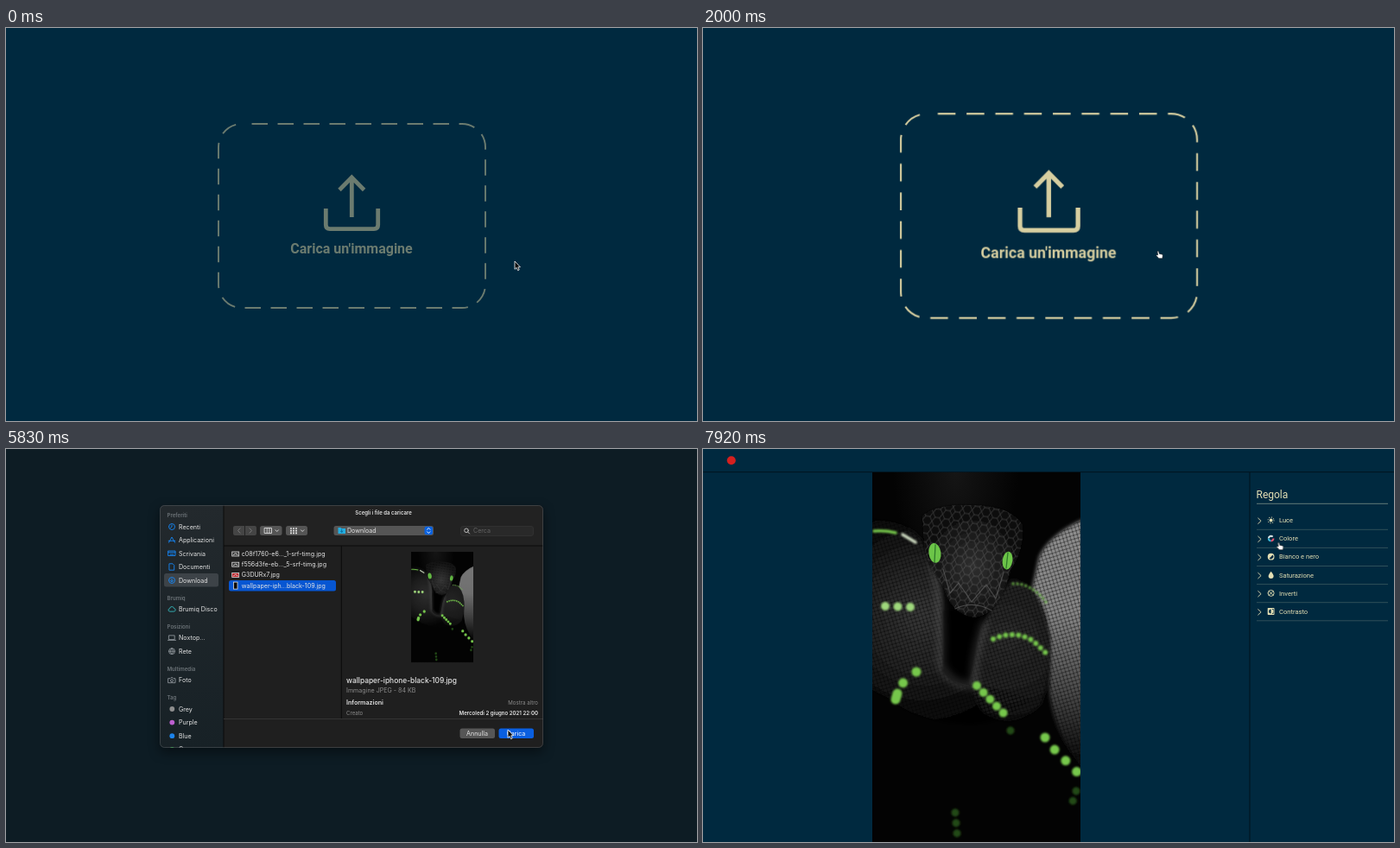
An HTML page for the animation above (8000 ms loop, 800 by 455 pixels).

```html
<!DOCTYPE html>
<html lang="it">
<head>
<meta charset="utf-8">
<title>Carica un'immagine</title>
<style>
  html, body { margin: 0; width: 100%; height: 100%; overflow: hidden; background: #00293f; }
  svg { display: block; }
  #stage { width: 100vw; height: 100vh; }
  text { font-family: Inter, sans-serif; font-size: 7.1px; fill: #e4e4e4; white-space: pre; }
  .brand text { font-family: Roboto, sans-serif; fill: #e4dfb4; }
  .line { fill: none; stroke-linecap: round; stroke-linejoin: round; }
  .head { font-size: 6.1px; font-weight: 600; fill: #6c7378; }
  .small { font-size: 6.1px; }
  .dim { fill: #8b8b8b; }
  .bold { font-weight: 600; }
  .mid { text-anchor: middle; }
  .end { text-anchor: end; }
  #upload { transform-origin: 400px 217.5px; }
  #dialog { filter: drop-shadow(0 5px 7px #0007); }
</style>
</head>
<body>
<svg id="stage" viewBox="0 0 800 455" preserveAspectRatio="none">
  <defs>
    <linearGradient id="pale" gradientUnits="userSpaceOnUse" x1="225" y1="70" x2="205" y2="330">
      <stop offset="0" stop-color="#8c8c8c"/><stop offset=".35" stop-color="#858585"/>
      <stop offset=".7" stop-color="#4a4a4a"/><stop offset="1" stop-color="#0c0c0c"/>
    </linearGradient>
    <radialGradient id="haze" cx=".4" cy="0" r=".3">
      <stop offset="0" stop-color="#151515"/><stop offset="1" stop-color="#030303"/>
    </radialGradient>
    <radialGradient id="leftTone" gradientUnits="userSpaceOnUse" cx="58" cy="165" r="125">
      <stop offset="0" stop-color="#363636"/><stop offset=".5" stop-color="#232323"/><stop offset="1" stop-color="#050505"/>
    </radialGradient>
    <radialGradient id="rightTone" gradientUnits="userSpaceOnUse" cx="155" cy="190" r="115">
      <stop offset="0" stop-color="#2c2c2c"/><stop offset=".6" stop-color="#1e1e1e"/><stop offset="1" stop-color="#040404"/>
    </radialGradient>
    <radialGradient id="face" cy=".55">
      <stop offset="0" stop-color="#303030"/><stop offset=".6" stop-color="#1a1a1a"/><stop offset="1" stop-color="#0b0b0b"/>
    </radialGradient>
    <linearGradient id="side" x2="0" y2="1">
      <stop offset="0" stop-color="#23292d"/><stop offset="1" stop-color="#172126"/>
    </linearGradient>
    <pattern id="scales" width="6" height="6" patternUnits="userSpaceOnUse" patternTransform="rotate(28)">
      <path d="M0 3 3 0 6 3 3 6Z" fill="none" stroke="#000" stroke-opacity=".5"/>
    </pattern>
    <pattern id="plates" width="11" height="10" patternUnits="userSpaceOnUse" patternTransform="rotate(9)">
      <path d="M0 5 3 0H8L11 5 8 10H3Z" fill="none" stroke="#888" stroke-opacity=".4" stroke-width=".8"/>
    </pattern>
    <filter id="soft" x="-.3" y="-.3" width="1.6" height="1.6"><feGaussianBlur stdDeviation="5"/></filter>
    <filter id="edge"><feGaussianBlur stdDeviation="2"/></filter>
    <filter id="glow"><feGaussianBlur stdDeviation="1.1"/></filter>
    <path id="flank" d="M245 54Q205 72 193 98L185 135 205 190V250Q208 300 245 345Z"/>
    <path id="leftCoil" d="M-8 56Q42 52 62 84 78 112 81 150 80 200 84 228 95 252 125 246L185 262Q150 292 112 292 50 288 20 262L-8 248Z"/>
    <path id="rightCoil" d="M162 124Q192 130 202 170 212 225 196 268 165 300 130 280 108 255 117 225 124 165 162 124Z"/>
    <path id="skull" d="M58 50Q76 36 115 38 160 38 174 61 176 92 160 112 148 164 119 168 91 165 83 133 66 112 60 88Z"/>
    <clipPath id="frame"><rect x="178" y="65" width="444" height="281" rx="5"/></clipPath>

    <symbol id="photo" viewBox="0 0 241 428">
      <rect width="241" height="428" fill="url(#haze)"/>
      <use href="#flank" fill="url(#pale)" filter="url(#edge)"/>
      <use href="#flank" fill="url(#scales)"/>
      <use href="#leftCoil" fill="url(#leftTone)" filter="url(#edge)"/>
      <use href="#rightCoil" fill="url(#rightTone)" filter="url(#edge)"/>
      <use href="#leftCoil" fill="url(#scales)"/>
      <use href="#rightCoil" fill="url(#scales)"/>
      <path d="M82 160Q84 210 81 230 92 246 110 244 119 225 126 158Z" fill="#010101" filter="url(#glow)"/>
      <path class="line" d="M70 105Q82 150 79 222 92 250 118 246 116 215 130 175" stroke="#777" stroke-width="7" opacity=".4" filter="url(#soft)"/>
      <use href="#skull" fill="url(#face)" filter="url(#glow)"/>
      <use href="#skull" fill="url(#plates)"/>
      <path class="line" d="M82 112 90 140 100 128 115 150 132 130 143 146 152 116M96 158Q117 148 138 160" stroke="#666" stroke-width="1.2" opacity=".6"/>
      <g class="line" stroke="#76c74c" filter="url(#glow)">
        <path d="M2 68Q15 67 27 70" stroke-width="3.5"/>
        <path d="M35 72 50 81" stroke="#cfdcc2" stroke-width="3.5"/>
        <path d="M15 155 45 156" stroke-width="10" stroke-dasharray="0 14.5" stroke="#9fd87c"/>
        <path d="M51 231 33 246 27 261" stroke-width="11" stroke-dasharray="0 20"/>
        <path d="M29 256 27 263" stroke-width="11"/>
        <path d="M121 247 152 279" stroke-width="10" stroke-dasharray="0 11"/>
        <path d="M140 193Q165 182 186 195L203 211" stroke-width="6" stroke-dasharray="0 7.5"/>
        <path d="M163 129Q184 128 201 150" stroke-width="3" stroke-dasharray="0 5"/>
        <path d="M200 307 209 319 224 334 238 348" stroke-width="11" stroke-dasharray="0 18"/>
        <path d="M160 299V300M236 369 231 384M96 394 98 418" stroke="#234a17" stroke-width="9" stroke-dasharray="0 12"/>
      </g>
      <g fill="#6cc548">
        <ellipse cx="72.5" cy="93.5" rx="7" ry="11.5" transform="rotate(-8 72 94)"/>
        <ellipse cx="156.5" cy="102" rx="5.8" ry="10.5" transform="rotate(8 156 102)"/>
      </g>
      <path class="line" d="M73 84 72 104M157 93 155 111" stroke="#2f7a2a" stroke-width="1.3"/>
    </symbol>
  </defs>

  <rect id="back" width="800" height="455" fill="#00293f"/>

  <g id="upload" class="brand" opacity=".5">
    <rect x="246" y="111" width="309" height="213" rx="27" fill="none" stroke="#d6cea0" stroke-width="1.9" stroke-dasharray="18.5 11.5" stroke-dashoffset="18.5"/>
    <path d="M400.3 219V174M386 187.5 400.3 173 414.6 187.5M370.3 209V228Q370.3 232.6 375 232.6H426Q430.7 232.6 430.7 228V209" fill="none" stroke="#d6cea0" stroke-width="4.8"/>
    <text class="mid" x="400" y="261.3" style="font-size:16px;font-weight:700;fill:#d6cea0">Carica un'immagine</text>
  </g>

  <g id="dialog" opacity="0">
    <g clip-path="url(#frame)">
      <rect x="178" y="65" width="444" height="281" fill="#1f1f1f"/>
      <rect x="252" y="65" width="370" height="47" fill="#222"/>
      <rect x="178" y="65" width="74" height="281" fill="url(#side)"/>
      <path d="M252 65V346M252 112H622M388.3 112V312" stroke="#0b0b0b"/>
      <path d="M252 312.5H622" stroke="#343434"/>
      <g id="sidebar"></g>
    </g>
    <rect x="178.5" y="65.5" width="443" height="280" rx="5" fill="none" stroke="#64696c" stroke-opacity=".55" stroke-width=".8"/>

    <text class="mid bold" x="437" y="75.6" style="font-size:6px">Scegli i file da caricare</text>
    <path d="M263 91a2 2 0 0 1 2-2h11v11h-11a2 2 0 0 1-2-2ZM277 89h11a2 2 0 0 1 2 2v7a2 2 0 0 1-2 2h-11Z" fill="#454545"/>
    <path class="line" d="M271 91.8 268.5 94.5 271 97.2M282 91.8 284.5 94.5 282 97.2" stroke="#777"/>
    <g fill="#555">
      <rect x="294" y="89" width="25.5" height="11" rx="2.5"/>
      <rect x="324" y="89" width="25" height="11" rx="2.5"/>
      <rect x="379.5" y="89" width="115.5" height="11" rx="2.5"/>
    </g>
    <path class="line" d="M299.5 91.5h8v6h-8ZM302.2 91.5v6M304.9 91.5v6M312 93.8l1.7 1.7 1.7-1.7M341.5 93.8l1.7 1.7 1.7-1.7" stroke="#ddd" stroke-width=".9"/>
    <path d="M329 92h8M329 94.7h8M329 97.4h8" stroke="#ddd" stroke-width="1.7" stroke-dasharray="2 1"/>
    <path d="M384.5 91h3l1 1h4.5v6h-8.5Z" fill="#24aee0"/>
    <path class="line" d="M388.7 93.2v3M387.5 95.2l1.2 1.2 1.2-1.2" stroke="#075c8c" stroke-width=".8"/>
    <text x="395" y="97.1">Download</text>
    <rect id="stepper" x="484.5" y="89.7" width="9.5" height="9.6" rx="2.2" fill="#0a62e0"/>
    <path class="line" d="M487.6 93.2l1.7-1.7 1.7 1.7M487.6 95.8l1.7 1.7 1.7-1.7" stroke="#fff" stroke-width=".9"/>
    <rect x="526.5" y="89.5" width="84" height="11" rx="2.5" fill="#292929" stroke="#353535" stroke-width=".7"/>
    <g class="line" stroke="#c8c8c8" stroke-width=".9"><circle cx="533" cy="94.3" r="2.3"/><path d="M534.8 96.1 536.6 98"/></g>
    <text x="541" y="97.3" style="fill:#666">Cerca</text>

    <rect id="row" x="258" y="152" width="124" height="12.4" rx="2.5" fill="#0756d2" opacity="0"/>
    <g id="files"></g>

    <g id="info" opacity="0">
      <text x="394" y="271" style="font-size:8.4px;font-weight:500">wallpaper-iphone-black-109.jpg</text>
      <text class="dim" x="394" y="282">Immagine JPEG - 84 KB</text>
      <text class="bold" x="394" y="295.6">Informazioni</text>
      <text class="small dim end" x="616" y="295.6">Mostra altro</text>
      <text class="small dim" x="394" y="308">Creato</text>
      <text class="small bold end" x="616" y="308">Mercoledì 2 giugno 2021 22:00</text>
    </g>
    <svg id="preview" x="469" y="118.5" width="72" height="129" opacity="0"><use href="#photo" width="72" height="129"/></svg>

    <rect x="525.5" y="323.5" width="40.5" height="11.5" rx="2.5" fill="#565656"/>
    <text class="mid" x="545.5" y="331.8">Annulla</text>
    <rect id="confirm" x="570.5" y="323.5" width="40.5" height="11.5" rx="2.5" fill="#3a3a3a"/>
    <text id="confirmLabel" class="mid" x="590.5" y="331.8">Carica</text>
  </g>

  <g id="editor" class="brand" opacity="0">
    <rect width="800" height="455" fill="#00293f"/>
    <path d="M0 26.7H800M633 27V455" stroke="#001724" stroke-width="1.3"/>
    <circle cx="32.8" cy="13.3" r="5" fill="#d4201f"/>
    <svg id="picture" x="196" y="27" width="241" height="428"><use href="#photo" width="241" height="428"/></svg>
    <text x="640.5" y="56.6" style="font-size:12px">Regola</text>
    <path d="M641 63.3H793" stroke="#7d9088" stroke-width=".8"/>
    <g id="tools"></g>
  </g>

  <g id="cursor">
    <path id="arrow" d="M0 0V9.3L2.1 7.4 3.6 10.7 5.2 10 3.8 6.8H6.4Z" fill="#050505" stroke="#fff" stroke-width=".8"/>
    <path id="hand" d="M0 .7Q.9-.4 1.6.8L2.3 3.4 5.2 4Q6.5 4.3 6.3 5.8L5.8 8.7H1.8L-1.2 5.4Q-1.4 4.1.7 5Z" fill="#fff" stroke="#111" stroke-width=".5" opacity="0"/>
  </g>
</svg>

<script>
const LOOP = 8000;
const $ = id => document.getElementById(id);
const text = (x, y, label, attrs = '') => `<text x="${x}" y="${y}" ${attrs}>${label}</text>`;
const icon = (x, y, d, color) =>
  `<path class="line" transform="translate(${x} ${y})" d="${d}" stroke="${color}" stroke-width=".9"/>`;

const ring = 'M-3.5 0a3.5 3.5 0 1 0 7 0a3.5 3.5 0 1 0-7 0';
const shapes = {
  clock: ring + 'M0-2V0L-1.5 1.2',
  apps: 'M-3.5 3 0-3.3 3.5 3M-3.8 1H3.8',
  desk: 'M-4-3H4V2.5H-4ZM-4-1.3H4M-2 1H2',
  doc: 'M-2.7-3.7H1L2.7-2V3.7H-2.7Z',
  down: ring + 'M0-1.8V1.7M-1.4.3 0 1.8 1.4.3',
  cloud: 'M-2.6 2.8Q-4.3 2.5-4 .8-3.7-.5-2.5-.5-2-3 .3-2.8 2.2-2.5 2.6-.6 4.5-.4 4.2 1.4 3.8 2.8 2.6 2.8Z',
  laptop: 'M-3.2-2.7H3.2V2H-3.2ZM-4.5 2.8H4.5',
  globe: ring + 'M-3.5 0H3.5M0-3.5Q-3 0 0 3.5 3 0 0-3.5',
  camera: 'M-4-2H-2L-1-3H1L2-2H4V3H-4ZM-1.5.5a1.5 1.5 0 1 0 3 0a1.5 1.5 0 1 0-3 0'
};
const blue = '#1686f5', grey = '#8d9499';
const heads = [['Preferiti', 76.5], ['Brumiq', 172.5], ['Posizioni', 205.7], ['Multimedia', 254.7], ['Tag', 288]];
const places = [
  ['Recenti', 90, 'clock', blue], ['Applicazioni', 105.3, 'apps', blue], ['Scrivania', 121, 'desk', blue],
  ['Documenti', 136.5, 'doc', blue], ['Download', 152, 'down', blue], ['Brumiq Disco', 185.3, 'cloud', '#35b8bd'],
  ['Noxtop...', 218.6, 'laptop', grey], ['Rete', 234.2, 'globe', grey], ['Foto', 267.7, 'camera', grey]
];
const tags = [['Grey', '#8e8e8e'], ['Purple', '#bd5fd0'], ['Blue', '#1c83ea'], ['Green', '#35b34a']];

$('sidebar').innerHTML =
  '<rect x="183" y="144" width="63" height="15.5" rx="2.5" fill="#3d4348"/>' +
  heads.map(([label, y]) => text(186.5, y + 2.2, label, 'class="head"')).join('') +
  places.map(([label, y, shape, color]) => icon(192, y, shapes[shape], color) + text(200, y + 2.5, label)).join('') +
  tags.map(([label, color], i) => {
    const y = 301 + i * 15.6;
    return `<circle cx="192.3" cy="${y}" r="2.9" fill="${color}"/>` + text(200, y + 2.5, label);
  }).join('');

const files = ['c08f1760-e6..._1-srf-timg.jpg', 'f556d3fe-eb..._5-srf-timg.jpg', 'G3DURx7.jpg', 'wallpaper-iph...black-109.jpg'];
$('files').innerHTML = files.map((name, i) => {
  const y = 121.5 + i * 12.2, tall = i === 3;
  const [w, h] = tall ? [4.6, 8] : [8, 5];
  const fill = i === 2 ? '#c2272d' : tall ? '#0a0a0a' : '#3c3c3c';
  return `<rect x="${265.7 - w / 2}" y="${y - h / 2}" width="${w}" height="${h}" fill="${fill}" stroke="#ddd" stroke-width=".8"/>` +
    (tall ? '' : icon(265.7, y, 'M-2.3 1 0-.6 2.3.8', '#ddd')) + text(272.8, y + 2.5, name);
}).join('');

const cream = '#e4dfb4';
const disc = (r, fill) => `<circle r="${r}" fill="${fill}"/>`;
const tools = [
  ['Luce', disc(1.9, cream) + `<circle r="3.4" fill="none" stroke="${cream}" stroke-width="1.1" stroke-dasharray=".9 1.77"/>`],
  ['Colore', `<g fill="none" stroke-width="2"><path d="M2-2A2.8 2.8 0 0 0-2.8 0" stroke="#d8e4e6"/><path d="M-2.8 0A2.8 2.8 0 0 0 0 2.8" stroke="#38b5d8"/><path d="M0 2.8A2.8 2.8 0 0 0 2.8 0" stroke="#e15270"/></g>`],
  ['Bianco e nero', disc(3.9, cream) + '<path d="M2.1-2.1A3 3 0 0 1-2.1 2.1Z" fill="#00293f"/>'],
  ['Saturazione', `<path d="M0-4Q3 0 3 1.2A3 3 0 0 1-3 1.2Q-3 0 0-4Z" fill="${cream}"/>`],
  ['Inverti', icon(0, 0, ring + 'M-2.4-2.4 2.4 2.4M2.4-2.4-2.4 2.4', cream)],
  ['Contrasto', `<rect x="-3.9" y="-3.9" width="7.8" height="7.8" rx=".7" fill="${cream}"/><path d="M0-2.5A2.5 2.5 0 0 0 0 2.5ZM1-2.9H2.9V2.9H1A3.4 3.4 0 0 0 1-2.9Z" fill="#00293f"/>`]
];
$('tools').innerHTML = tools.map(([label, mark], i) => {
  const y = 82.5 + i * 21.1;
  return icon(644.4, y + .8, 'M-1.7-3.2 1.7 0-1.7 3.2', cream) +
    `<g transform="translate(657.6 ${y})">${mark}</g>` +
    text(667, y + 2.7, label, 'style="font-size:7.6px"') +
    `<path d="M641 ${y + 10.8}H793" stroke="#3c5a60" stroke-width=".8"/>`;
}).join('');

// Each step is [time in ms, properties]; the first and last values are held.
function play(id, steps, easing = 'linear') {
  const frames = [[0, steps[0][1]], ...steps, [LOOP, steps.at(-1)[1]]]
    .map(([time, props]) => ({ ...props, offset: time / LOOP, easing }));
  $(id).animate(frames, { duration: LOOP, iterations: Infinity });
}
const fade = (id, steps, easing) => play(id, steps.map(([t, opacity]) => [t, { opacity }]), easing);
const tint = (id, steps, easing) => play(id, steps.map(([t, fill]) => [t, { fill }]), easing);
const move = (x, y) => ({ transform: `translate(${x}px, ${y}px)` });
const sheet = (opacity, y) => ({ opacity, ...move(0, y) });
const zoom = (scale, opacity) => ({ transform: `scale(${scale})`, opacity });

play('upload', [[330, zoom(1, .5)], [700, zoom(1.122, 1)], [1050, zoom(1.11, 1)]], 'ease-in-out');
tint('back', [[2080, '#00293f'], [2420, '#0d1c24'], [6060, '#0d1c24'], [6330, '#00253a'], [6500, '#00293f']]);
play('dialog', [[2080, sheet(0, -16)], [2420, sheet(1, 0)], [6060, sheet(1, 0)], [6330, sheet(.4, -14)], [6500, sheet(0, -16)]]);
fade('sidebar', [[6060, 1], [6330, .3]]);

fade('row', [[0, 0], [4330, 1]], 'step-end');
fade('info', [[0, 0], [4420, 1]], 'step-end');
fade('preview', [[0, 0], [4660, 1]], 'step-end');
tint('stepper', [[0, '#0a62e0'], [6170, '#555']], 'step-end');
tint('confirm', [[0, '#3a3a3a'], [4420, '#0a5fe0'], [6170, '#565656']], 'step-end');
tint('confirmLabel', [[0, '#747474'], [4420, '#fff'], [6170, '#e4e4e4']], 'step-end');
fade('editor', [[6830, 0], [7200, 1]]);
fade('picture', [[6900, 0], [7580, 1]]);

play('cursor', [
  [80, move(589, 270)], [700, move(535, 261)], [1100, move(526, 258)], [2000, move(526, 258)],
  [2500, move(366, 179)], [2700, move(366, 179)], [3400, move(350, 167)], [4250, move(349, 166)],
  [5000, move(349, 166)], [5700, move(581, 325)], [6000, move(581, 325)], [6250, move(581, 327)],
  [7080, move(581, 327)], [7880, move(665.5, 108)]
], 'ease-in-out');
fade('hand', [[0, 0], [420, 1], [2080, 0], [7670, 1]], 'step-end');
fade('arrow', [[0, 1], [420, 0], [2080, 1], [7670, 0]], 'step-end');
</script>
</body>
</html>
```
